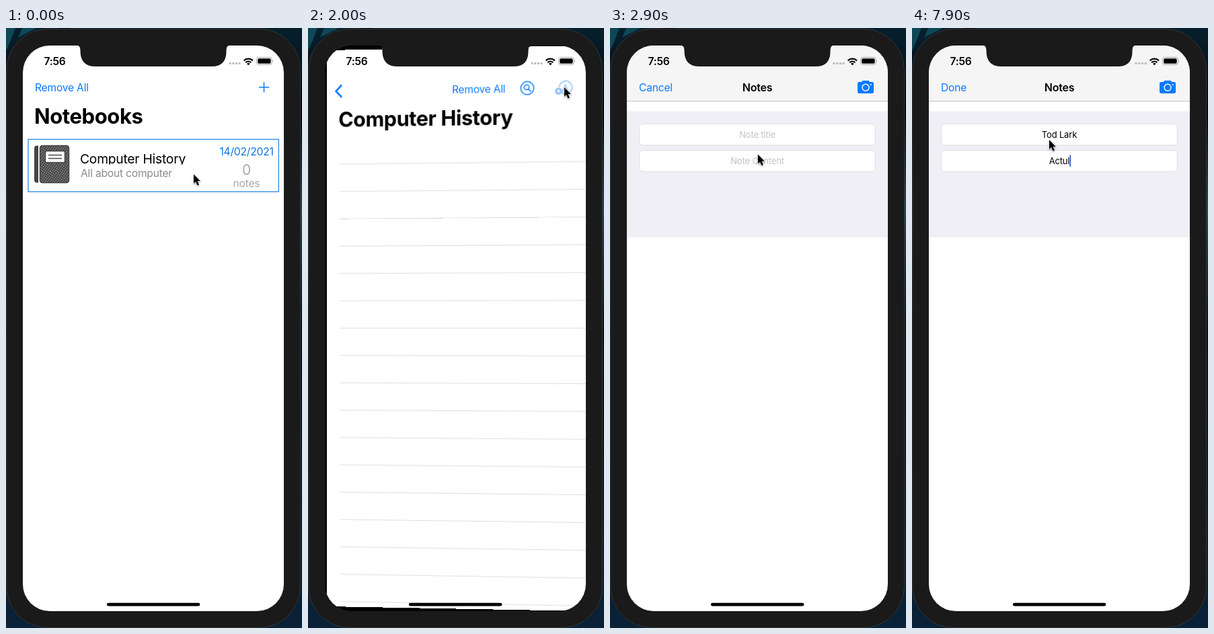
These frames come from a looping animation (440x890 px, 8000 ms). An HTML page:

```html
<!DOCTYPE html>
<html lang="en">
<head>
<meta charset="utf-8">
<title>Notebooks</title>
<style>
  html, body { margin: 0; width: 100%; height: 100%; overflow: hidden; background: #06141f; }
  svg { position: absolute; left: 0; top: 0; display: block; }
  #screen {
    position: absolute; left: 25px; top: 26px; width: 388px; height: 839px;
    border-radius: 40px; overflow: hidden; background: #000; perspective: 1136px;
  }
  text {
    font: 15.6px Inter, "Liberation Sans", sans-serif;
    font-optical-sizing: none; letter-spacing: -.013em; white-space: pre;
  }
  .big { font-size: 31px; font-weight: 700; }
  .bold { font-weight: 600; }
  .row { font-size: 19.3px; }
  .field { font-size: 13px; }
  .mid { text-anchor: middle; }
  .blue { fill: #0a7aff; }
  .line { fill: none; stroke: #0a7aff; stroke-width: 1.5; stroke-linecap: round; stroke-linejoin: round; }
  .box { fill: #fff; stroke: #dedee1; }
</style>
</head>
<body>
<svg width="440" height="890">
  <defs>
    <linearGradient id="edge" x2="0" y2="1">
      <stop offset="0" stop-color="#07202e"/>
      <stop offset=".14" stop-color="#02070c"/>
      <stop offset=".3" stop-color="#17505c"/>
      <stop offset=".5" stop-color="#04121c"/>
      <stop offset="1" stop-color="#0a2238"/>
    </linearGradient>
  </defs>
  <rect width="440" height="890" fill="url(#edge)"/>
  <path d="M0 0H14L8 16 0 34zM24 0H46L18 14z" fill="#0f4757"/>
  <path d="M78 0h18v3H78z" fill="#000"/>
  <rect x=".8" y="1.5" width="436.7" height="888" rx="61" fill="#1a1a1a" stroke="#323436"/>
</svg>

<div id="screen">
  <svg id="list" width="388" height="839" viewBox="25 26 388 839">
    <defs>
      <pattern id="cloth" width="3" height="3" patternUnits="userSpaceOnUse" patternTransform="rotate(35)">
        <rect width="3" height="3" fill="#454545"/><circle cx="1.5" cy="1.5" r=".65" fill="#ccc"/>
      </pattern>
      <clipPath id="rowClip"><path d="M100 180H300V202.5H100z"/></clipPath>
    </defs>
    <path d="M25 26h388v839H25z" fill="#fff"/>
    <g id="listBody">
      <text x="42" y="142.3" class="big">Notebooks</text>
      <rect id="row" x="33" y="165.2" width="372.3" height="77.6" fill="#fff" stroke="#2b88e8" stroke-width="1.3"/>
      <path d="M48 174.500V229.500H46a4 4 0 0 1-4-4V178.500a4 4 0 0 1 4-4z" fill="#454545"/>
      <rect x="50.500" y="174.500" width="43" height="55" rx="3.500" fill="url(#cloth)" stroke="#454545" stroke-width="1.500"/>
      <rect x="58.500" y="182.500" width="29" height="17" rx="2" fill="#fff" stroke="#454545" stroke-width="1.500"/>
      <path d="M63 188.500h20M63 193.500h20" stroke="#454545" stroke-width="1.600"/>
      <text x="110" y="200.500" class="row" clip-path="url(#rowClip)">Computer History</text>
      <text x="111" y="221" fill="#8a8a8d">All about computer</text>
      <text x="357.500" y="188.700" class="mid" fill="#0f73dd">14/02/2021</text>
      <text x="357.500" y="217.500" class="mid" style="font-size:21px" fill="#a8a8aa">0</text>
      <text x="357.500" y="236" class="mid" fill="#a8a8aa">notes</text>
    </g>
    <g id="listNav">
      <text x="43" y="93.600" class="blue">Remove All</text>
      <path d="M376.500 88h14M383.500 81v14" class="line"/>
    </g>
  </svg>

  <svg id="notes" width="388" height="839" viewBox="25 26 388 839">
    <g id="notesBody">
      <path d="M25 108h388v757H25z" fill="#fff"/>
      <text x="42.300" y="142.300" class="big">Computer History</text>
      <g id="rules" stroke="#dcdcde"></g>
    </g>
    <g id="notesNav">
      <path id="navFill" d="M25 26h388v83H25z" fill="#fff"/>
      <path d="M46.500 79.500L38.500 88l8 8.500" class="line" style="stroke-width:2.700"/>
      <text x="214" y="93.600" class="blue">Remove All</text>
      <g class="line">
        <circle cx="326.500" cy="87.800" r="9.700"/>
        <circle cx="325.500" cy="86.600" r="3.700"/>
        <path d="M328.300 89.400l3.200 3.200"/>
      </g>
      <g id="addIcon">
        <path d="M374 86.500a9.500 9.500 0 1 1 15.500 8.500M379 97l.6-5 3.400-8.500 3.400 8.500.6 5zM387 97h2" class="line"/>
        <circle cx="373" cy="93" r="5.300" class="blue"/>
        <path d="M370.300 93h5.400M373 90.300v5.400" stroke="#fff" stroke-width="1.300"/>
      </g>
    </g>
  </svg>

  <svg id="form" width="388" height="839" viewBox="25 26 388 839">
    <defs>
      <linearGradient id="shade" x1=".4" x2=".55" y2="1">
        <stop offset="0" stop-opacity=".2"/><stop offset=".6" stop-opacity="0"/>
      </linearGradient>
    </defs>
    <path d="M25 26h388v839H25z" fill="#fff"/>
    <path d="M25 26h388v82H25z" fill="#f5f5f5"/>
    <path id="navShade" d="M25 26h388v82H25z" fill="url(#shade)"/>
    <path d="M25 108.500h388" stroke="#c3c3c5"/>
    <path d="M25 123.500h388V310.500H25z" fill="#f0eff5"/>
    <text id="leave" x="43" y="93.600" class="blue"></text>
    <text x="219" y="93.600" class="mid bold" style="font-size:16px">Notes</text>
    <path d="M374 80l1.500-2h9l1.500 2h3.500q2.500 0 2.500 2.500v12q0 2.500-2.500 2.500h-19q-2.500 0-2.500-2.500v-12q0-2.500 2.500-2.500z" class="blue"/>
    <circle cx="380" cy="88.300" r="5" fill="none" stroke="#fff" stroke-width="1.400"/>
    <circle cx="387.800" cy="84" r="1.100" fill="#fff"/>
    <rect x="43.800" y="142.300" width="350.400" height="31.500" rx="5" class="box"/>
    <rect x="43.800" y="181.500" width="350.400" height="31.500" rx="5" class="box"/>
    <text id="title" x="219" y="162.500" class="mid field"></text>
    <text id="content" x="219" y="201.700" class="mid field"></text>
    <rect id="caret" width="1.900" height="17.500" rx=".8" fill="#3567cf"/>
  </svg>
</div>

<svg width="440" height="890">
  <defs>
    <linearGradient id="fade"><stop stop-color="#3c3c3c"/><stop offset=".6" stop-color="#555"/><stop offset="1" stop-color="#aaa"/></linearGradient>
  </defs>
  <path d="M104 25.500q6.500 0 6.500 7v3Q111.500 57 132.500 57H306Q327 57 327.500 35.500v-3q0-7 6.500-7z" fill="#1a1a1a"/>
  <text x="56.500" y="54.700" class="bold">7:56</text>
  <path d="M333 52.500h14.200" stroke="#bdbdbf" stroke-width="3.600" stroke-linecap="round" stroke-dasharray="0 4.700"/>
  <g fill="none" stroke="#000" stroke-width="2.200">
    <path d="M353.600 48.400a9.600 9.600 0 0 1 13.400 0M356.200 51.200a5.800 5.800 0 0 1 8.200 0"/>
  </g>
  <path d="M360.300 55.200l-2.300-2.300a3.300 3.300 0 0 1 4.600 0z"/>
  <rect x="372.500" y="43.500" width="22.800" height="11" rx="3.300" fill="none" stroke="#a5a5a5"/>
  <rect x="374.200" y="45.200" width="19.400" height="7.600" rx="1.900"/>
  <path d="M396.400 47.200q1.600 1.800 0 3.600z" fill="#a5a5a5"/>
  <rect id="home" x="149.800" y="852.700" width="138.600" height="4.800" rx="2.400"/>
  <path id="pointer" d="M0 0V13.800L3 11l2.500 5.500 2.500-1.100L5.600 10h4.300z" stroke="#fff" stroke-width="1.100" paint-order="stroke"
    style="filter:drop-shadow(0 1px 1px #0006)"/>
</svg>

<script>
const LOOP = 8000, FRAME = 100;
const $ = id => document.getElementById(id);
const smooth = (t, from, to) => {
  const x = Math.min(1, Math.max(0, (t - from) / (to - from)));
  return x * x * (3 - 2 * x);
};

for (let y = 198; y < 865; y += 41.2)
  $('rules').innerHTML += `<path d="M44 ${y}H413"/>`;

// time, x, y
const path = [
  [0, 279, 217], [600, 282, 213], [1000, 282, 213], [1750, 381, 88],
  [2000, 381, 88], [2400, 284, 274], [3100, 204, 166]
];
const fields = [
  { id: 'title', hint: 'Note title', value: 'Tod Lark', focus: 3300, blur: 6300,
    keys: [4400, 4700, 4900, 5200, 5500, 5700, 5900, 6100] },
  { id: 'content', hint: 'Note Content', value: 'Actul', focus: 6300, blur: LOOP,
    keys: [6900, 7100, 7300, 7600, 7900] }
];

function movePointer(t) {
  let [, x, y] = path[0];
  for (let i = 1; i < path.length; i++) {
    const k = smooth(t, path[i - 1][0], path[i][0]);
    x += (path[i][1] - path[i - 1][1]) * k;
    y += (path[i][2] - path[i - 1][2]) * k;
  }
  $('pointer').setAttribute('transform', `translate(${x} ${y})`);
}

function push(t) {
  const p = 1 - (1 - smooth(t, 100, 600)) ** 2;
  $('row').setAttribute('fill', t >= 100 && t < 600 ? '#e8e8ea' : '#fff');
  $('listBody').setAttribute('transform', `translate(${-116 * p} 0)`);
  $('notesBody').setAttribute('transform', `translate(${388 * (1 - p)} 0)`);
  $('listNav').setAttribute('opacity', 1 - p);
  $('notesNav').setAttribute('opacity', p);
}

// The near edge stays in the screen plane while the page turns.
function flip(t) {
  const angle = 180 * smooth(t, 1952, 2597);
  const depth = Math.sin(angle * Math.PI / 180);
  const turn = a => angle % 180 ? `translateZ(${-194 * depth}px) rotateY(${a}deg)` : 'none';
  const show = (id, on) => $(id).style.display = on ? '' : 'none';
  $('notes').style.transform = turn(-angle);
  $('form').style.transform = turn(180 - angle);
  show('list', t < 900);
  show('notes', t >= 100 && angle < 90);
  show('form', angle >= 90);
  $('addIcon').setAttribute('opacity', t < 1900 ? 1 : .45);
  $('navShade').setAttribute('opacity', depth);
}

function type(t) {
  $('leave').textContent = t < 3300 ? 'Cancel' : 'Done';
  $('caret').setAttribute('opacity', 0);
  for (const f of fields) {
    const count = f.keys.filter(k => k <= t).length;
    const label = $(f.id);
    label.textContent = count ? f.value.slice(0, count) : f.hint;
    label.setAttribute('fill', count ? '#000' : '#c3c3c6');
    if (t < f.focus || t >= f.blur) continue;
    const half = label.getComputedTextLength() / 2;
    const since = t - (count ? f.keys[count - 1] : f.focus);
    $('caret').setAttribute('x', 219 + (count ? half : -half - 1.3));
    $('caret').setAttribute('y', label.getAttribute('y') - 13.5);
    $('caret').setAttribute('opacity', since % 1000 < 500 ? 1 : 0);
  }
}

function draw(now) {
  const t = Math.floor(now % LOOP / FRAME) * FRAME;
  movePointer(t);
  push(t);
  flip(t);
  type(t);
  $('home').setAttribute('fill',
    t >= 200 && t <= 700 ? 'url(#fade)' : t >= 2200 && t <= 2600 ? '#444' : '#000');
  requestAnimationFrame(draw);
}
draw(performance.now());
</script>
</body>
</html>
```
